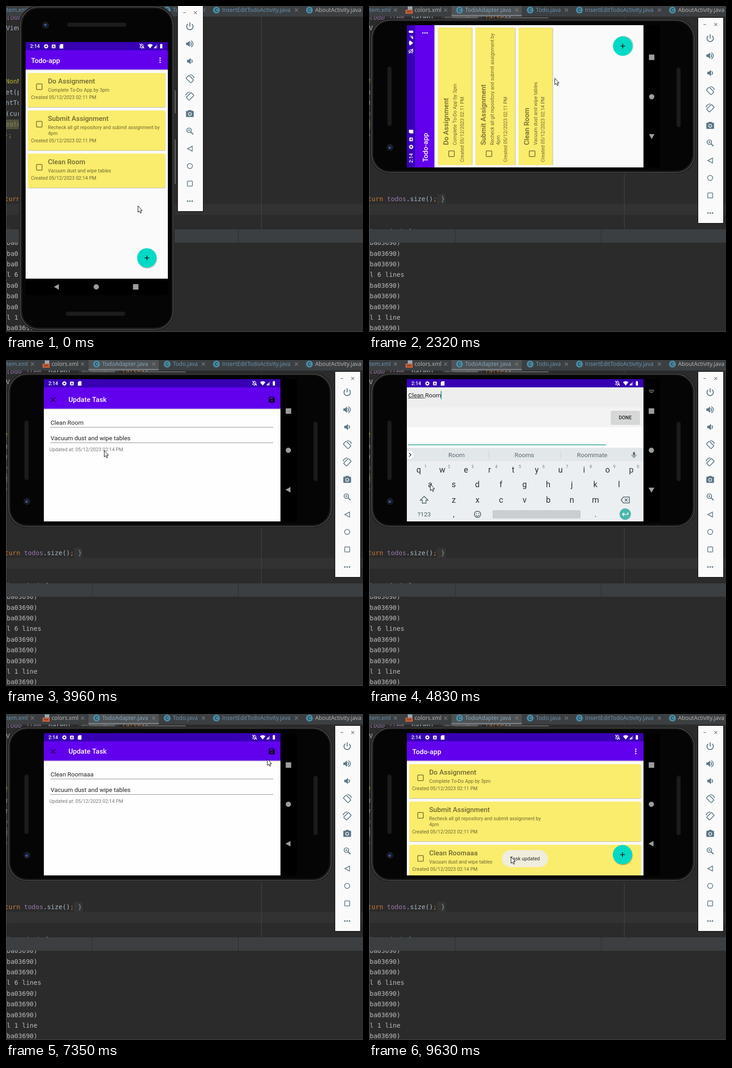
Recreate the animation shown at these times as an HTML page with a canvas. Size 783 by 715 pixels, loop 9650 ms.

```html
<!DOCTYPE html>
<html lang="en">
<head>
<meta charset="utf-8">
<title>Todo-app</title>
<style>
html, body { margin: 0; width: 100%; height: 100%; overflow: hidden; background: #2b2b2b; }
canvas { display: block; }
</style>
</head>
<body>
<canvas id="stage" width="783" height="715"></canvas>
<script>
const c = document.getElementById('stage').getContext('2d');
const LOOP = 9650, MONO = '"DejaVu Sans Mono", monospace', TAB = '"Open Sans", sans-serif';
const BLUE = '#6897bb', GREY = '#bbbbbb', SLATE = '#5b7785', INK = 'rgba(0,0,0,.56)';

// bursts of activity: start, end, number of steps
const BURSTS = [[120, 1050, 8], [1200, 1650, 4], [2050, 2320, 3], [2720, 3580, 7], [3840, 4830, 9],
  [4970, 5880, 8], [6030, 6930, 8], [7080, 7500, 4], [7900, 8940, 9], [9080, 9630, 5]];

const POINTER = [[0, 289, 438], [120, 292, 430], [390, 345, 352], [520, 395, 300], [700, 462, 255], [850, 474, 212],
  [1050, 428, 168], [1650, 407, 158], [2320, 407, 158], [2720, 400, 165], [3007, 383, 176], [3580, 215, 318],
  [3840, 215, 300], [3964, 215, 198], [4210, 170, 134], [4400, 170, 134], [4830, 134, 272], [5370, 134, 272],
  [5750, 558, 334], [6030, 560, 336], [6416, 550, 198], [6930, 562, 127], [7080, 562, 127], [7500, 578, 84],
  [8160, 576, 84], [8940, 200, 305], [9080, 205, 306], [9630, 311, 313]];
const TURN = [[2320, -90], [2720, -42], [2863, -10], [3007, -1.2], [3150, 0]];
const OPEN = [[3840, 14, .6], [3964, 4.5, 1], [4088, 0, 1]];
const CLOSE = [[8030, -6, .1, 245], [8160, -2, .07, 288], [8290, 0, 0, 312]];
const TOAST = [[8030, 0], [8160, .3], [8290, .7], [8420, .95]];

function held(t) {
  let out = 0;
  for (const [a, b, n] of BURSTS) {
    if (t < a) break;
    const gap = (b - a) / (n - 1);
    out = a + gap * Math.min(n - 1, Math.floor((t - a) / gap + .2));
  }
  return out;
}

function at(keys, t) {
  let i = keys.findIndex(k => k[0] > t);
  if (i < 0) return keys[keys.length - 1].slice(1);
  if (!i) return keys[0].slice(1);
  const a = keys[i - 1], b = keys[i], f = (t - a[0]) / (b[0] - a[0]);
  return a.slice(1).map((v, j) => v + (b[j + 1] - v) * f);
}

function rect(x, y, w, h, fill) { c.fillStyle = fill; c.fillRect(x, y, w, h); }
function paint(fill, stroke, width = 1) {
  if (fill) { c.fillStyle = fill; c.fill(); }
  if (stroke) { c.strokeStyle = stroke; c.lineWidth = width; c.stroke(); }
}
function round(x, y, w, h, r, fill, stroke, width) {
  c.beginPath(); c.roundRect(x, y, w, h, r); paint(fill, stroke, width);
}
function disc(x, y, r, fill, stroke, width) {
  c.beginPath(); c.arc(x, y, r, 0, 7); paint(fill, stroke, width);
}
function arc(x, y, r, from, to, stroke, width) {
  c.beginPath(); c.arc(x, y, r, from, to); paint(null, stroke, width);
}
function poly(pts, fill, stroke, width, open) {
  c.beginPath();
  for (let i = 0; i < pts.length; i += 2) c.lineTo(pts[i], pts[i + 1]);
  if (!open) c.closePath();
  paint(fill, stroke, width);
}
function line(x1, y1, x2, y2, stroke, width) { poly([x1, y1, x2, y2], null, stroke, width, true); }
function cross(x, y, r, color, width) {
  line(x - r, y - r, x + r, y + r, color, width);
  line(x - r, y + r, x + r, y - r, color, width);
}
function plus(x, y, r, color, width) {
  line(x - r, y, x + r, y, color, width);
  line(x, y - r, x, y + r, color, width);
}
// y is the middle of the capitals
function text(s, x, y, size, color, align = 'left', style = '400', family = 'Roboto, sans-serif') {
  c.font = `${style} ${size}px ${family}`;
  c.fillStyle = color;
  c.textAlign = align;
  c.fillText(s, x, Math.round(y + size * .36));
}
const code = (s, x, y, color, style) => text(s, x, y, 14, color, 'left', style, MONO);
function group(x, y, fn, deg = 0) {
  c.save(); c.translate(x, y); c.rotate(deg * Math.PI / 180); fn(); c.restore();
}
function clip(x, y, w, h) { c.beginPath(); c.rect(x, y, w, h); c.clip(); }

function editor() {
  rect(0, 0, 783, 715, '#2b2b2b');
  rect(0, 434, 783, 24, '#323232');
  rect(559.5, 23, 1, 467, '#4b4b4b');
  rect(0, 249, 40, 21, '#52503a');

  code('todo_item', 1, 25, '#9876aa', 'italic 400');
  code(', parent,', 76, 25, '#a9b7c6');
  round(160, 16, 88, 18, 4, '#3b3b3b');
  text('attachToRoot:', 166, 25, 12, '#7a7a7a');
  code('false', 254, 25, '#cc7832');
  code(');', 296, 25, '#a9b7c6');
  code('View', 0, 48, '#a9b7c6');
  code('NonNull', -1, 165, '#bbb529');
  code('et(p', -1, 189, '#a9b7c6');
  code('ntTo', -1, 212, '#a9b7c6');
  code('(cur', -1, 236, '#a9b7c6');
  code('eate', -1, 259, '#7d8a55');
  code(')', -4, 283, '#a9b7c6');
  code(';', 5, 283, '#cc7832');
  round(149, 412, 19, 22, 2, '#343434');
  code('return', -19.5, 423, '#cc7832');
  code('todos', 39.5, 423, '#9876aa');
  code('.size()', 81.5, 423, '#a9b7c6');
  code(';', 140.5, 423, '#cc7832');
  code('}', 158, 423, '#8a9a8a');
  code('i  todos) {', 0, 495, '#a9b7c6');

  rect(0, 0, 783, 23, '#3c3f41');
  rect(181, 0, 154, 23, '#4e5254');
  rect(181, 19.5, 154, 3.5, '#747a80');
  const tabs = [[1, 'tem.xml', BLUE, 58], [100, 'colors.xml', GREY, 168], [211, 'TodoAdapter.java', '#86abc6', 324],
    [366, 'Todo.java', BLUE, 433], [474, 'InsertEditTodoActivity.java', BLUE, 637], [678, 'AboutActivity.java', GREY]];
  tabs.forEach(([x, name, color, close], i) => {
    text(name, x, 9, 12.3, color, 'left', '400', TAB);
    if (close) cross(close, 9, 3.5, '#7c8083', 1.1);
    if (i > 1) {
      disc(x - 12.5, 9, 7.5, '#4a8ca6');
      text('C', x - 12.5, 9, 10.5, '#20333c', 'center', '500');
    }
  });
  rect(85, 1, 10, 8, '#9aa7b0');
  rect(80, 8, 16, 9, '#c4603a');
  text('<>', 88, 12, 9, '#3c2a22', 'center', '500');

  rect(0, 490, 783, 29, '#3c3f41');
  rect(189, 490, 1, 29, '#2a2a2a');
  rect(509, 490, 1, 29, '#2a2a2a');
  c.save();
  clip(0, 519, 783, 196);
  const hex = 'ba03690)';
  [hex, hex, hex, 'l 6 lines', hex, hex, hex, 'l 1 line', hex].forEach((s, i) => code(s, 1.5, 519.2 + i * 23.4, GREY));
  c.restore();
  rect(0, 23, 1, 692, '#55585a');
  rect(0, 714, 783, 1, '#4a4c4e');
}

function grille(y) {
  round(134, y - 4, 130, 8, 4, '#141414', '#1e1e1e');
  c.setLineDash([1.2, 1.2]);
  for (const d of [-2, 0, 2]) line(137, y + d, 261, y + d, '#363636', 1);
  c.setLineDash([]);
}

// upright handset
function body() {
  rect(368, 185, 4, 50, '#6a6a6a');
  rect(368, 293, 4, 97, '#6a6a6a');
  round(28.5, -1, 341, 713.5, 42, '#1a1a1a', '#333');
  round(31.5, 2, 335, 707.5, 40, null, '#505050', 1.6);
  round(35, 5, 329, 701, 37, '#050505', '#1c1c1c');
  rect(43, 79, 312, 555, '#000');
  grille(41);
  group(-2.5, 0, () => grille(675));
  disc(87, 42, 7, '#15171c', '#22252a');
  disc(87, 42, 4, '#1d2c55');
  disc(86, 41, 1.6, '#6d86bd');
}

const NAV = '#9c9c9c';
function backKey(x, y, r = 6) { poly([x - r, y, x + r - 1, y - r, x + r - 1, y + r], NAV); }
function navPortrait() {
  backKey(111, 616);
  disc(198, 616, 5.8, NAV);
  rect(278.5, 610, 12, 12, NAV);
}
function navLandscape(typing) {
  rect(613.5, 106, 12, 12, NAV);
  disc(619.3, 198, 5.8, NAV);
  if (!typing) return backKey(619, 284.5);
  poly([613, 280, 626, 280, 619.5, 291], NAV);
  for (let i = 0; i < 10; i++) rect(614 + i % 5 * 2.4, 65 + (i > 4) * 2.6, 1.5, 1.6, NAV);
  rect(616.5, 70.5, 6, 1.4, NAV);
}

function statusBar(w) {
  rect(0, 0, w, 18, '#3700b3');
  text('2:14', 10, 9.4, 10.7, '#fff', 'left', '500');
  disc(45, 9.4, 2.9, null, '#fff', 2);
  for (let i = 0; i < 8; i++) group(45, 9.4, () => rect(-.9, -4.9, 1.8, 2, '#fff'), i * 45);
  round(57.5, 5.4, 8, 8, 1, '#fff');
  text('A', 61.5, 9.4, 7, '#3700b3', 'center', '700');
  poly([77, 4.5, 82.5, 4.5, 82.5, 14.2, 74.5, 14.2, 74.5, 7], '#fff');
  const bell = w - 57;
  poly([bell - 4, 12, bell - 3, 10, bell - 3, 7, bell, 4, bell + 3, 7, bell + 3, 10, bell + 4, 12], null, '#fff', 1.2);
  rect(bell - 1, 12.8, 2, 1.5, '#fff');
  line(bell - 5, 4, bell + 5, 14, '#fff', 1.2);
  c.beginPath(); c.moveTo(w - 39, 14); c.arc(w - 39, 13.6, 9, -2.28, -.86); paint('#fff');
  poly([w - 31, 13.5, w - 23, 13.5, w - 23, 5], 'rgba(255,255,255,.45)');
  poly([w - 31, 13.5, w - 26, 13.5, w - 26, 8], '#fff');
  round(w - 17, 5, 5, 9, 1, '#fff');
  rect(w - 15.7, 4, 2.4, 2, '#fff');
}

function header(w, off) {
  rect(0, 60 + off, w, 2.5, 'rgba(0,0,0,.13)');
  rect(0, 18, w, 42.3 + off, '#6200ee');
}

function listPage(w, h, third, off = 0, dim = 0, cut = h) {
  c.save();
  clip(0, 0, w, h);
  rect(0, 0, w, h, '#fefefe');
  c.save();
  clip(0, 0, w, cut);
  rect(0, 0, w, h, '#fafafa');
  header(w, off);
  c.translate(0, off);
  text('Todo-app', 12, 40.2, 15.1, '#fff', 'left', '500');
  for (const d of [-4.6, 0, 4.6]) disc(w - 17, 39.8 + d, 1.5, '#fff');
  const cards = [['Do Assignment', '11', 'Complete To-Do App by 3pm'],
    ['Submit Assignment', '11', 'Recheck all git repository and submit assignment by', '4pm'],
    [third, '14', 'Vacuum dust and wipe tables']];
  let y = 68;
  for (const [title, min, ...lines] of cards) {
    const ch = 62.5 + 12.4 * lines.length;
    round(5, y + 1, w - 10.5, ch, 2.5, 'rgba(0,0,0,.26)');
    round(5, y, w - 10.5, ch, 2.5, '#faec6c');
    round(23.8, y + 23.8, 12.4, 12.4, 1.5, null, '#716a33', 1.5);
    text(title, 49, y + 17.3, 15.1, INK, 'left', '500');
    lines.forEach((s, i) => text(s, 49, y + 37 + i * 12.5, 10.6, INK));
    text(`Created 05/12/2023 02:${min} PM`, 11.7, y + ch - 21.8, 10.6, INK);
    y += ch + 7.3;
  }
  disc(w - 45, h - 43.5, 21.5, 'rgba(0,0,0,.2)');
  disc(w - 46, h - 45.5, 21.3, '#03dac5');
  plus(w - 46, h - 45.5, 5.3, '#111', 1.5);
  c.translate(0, -off);
  statusBar(w);
  if (dim) rect(0, 0, w, h, `rgba(0,0,0,${dim})`);
  c.restore();
  c.restore();
}

function updatePage(w, h, name, off) {
  c.save();
  clip(0, 0, w, h);
  rect(0, 0, w, h, '#fefefe');
  header(w, off);
  c.translate(0, Math.round(off));
  cross(20.5, 40, 4.7, '#0a0014', 1.5);
  text('Update Task', 54, 40, 15.1, '#fff', 'left', '500');
  poly([493.5, 33.5, 503.5, 33.5, 506.5, 36.5, 506.5, 46.5, 493.5, 46.5], '#0a0014');
  rect(495.5, 35, 7, 3.4, '#6200ee');
  disc(500, 42.6, 2, '#6200ee');
  [[name, 90], ['Vacuum dust and wipe tables', 124]].forEach(([s, y]) => {
    text(s, 14.8, y, 13.4, '#222');
    rect(14, y + 10, 489, 1, '#8a8a8a');
  });
  text('Updated at: 05/12/2023 02:14 PM', 12, 149, 10.7, '#777');
  c.translate(0, -Math.round(off));
  statusBar(w);
  c.restore();
}

// full-screen text entry, in stage coordinates
function keyboard(word, rest, hints, caretAt, caret) {
  const KEY = '#263238';
  rect(83, 60, 519, 45, '#eeeeee');
  rect(83, 104, 519, 44, '#f3f3f3');
  rect(83, 147, 519, 46, '#fdfdfd');
  text(word + rest, 86, 77, 13.4, '#222');
  const wide = c.measureText(word).width, all = c.measureText(word + rest).width;
  rect(86, 83, wide, 1, '#333');
  if (caret) rect(85.3 + (caretAt ? all : 0), 68, 1.5, 18, '#00897b');
  rect(85.5, 185.3, 434, 1.6, '#2aa194');
  round(531, 112, 62.5, 29.5, 2, '#d6d7d7', '#c9c9c9', .8);
  text('DONE', 562, 126.5, 10.6, '#222', 'center', '500');

  rect(83, 192.5, 519, 30, '#e2e7ea');
  rect(83, 222, 519, 132, '#eceff1');
  c.save(); clip(83, 192, 30, 30); disc(89, 208, 9, '#fff'); c.restore();
  poly([88, 204, 92, 208, 88, 212], null, KEY, 1.5, true);
  hints.forEach((s, i) => text(s, 192 + i * 148.7, 208.5, 13.6, '#5d686e', 'center'));
  rect(262, 199, 1, 18, '#cbd1d5');
  rect(419.5, 199, 1, 18, '#cbd1d5');
  round(579, 201.5, 4.4, 8.5, 2.2, '#5d686e');
  arc(581.2, 207.5, 4.6, 0, Math.PI, '#5d686e', 1.4);
  rect(580.5, 212, 1.4, 3, '#5d686e');

  [['qwertyuiop', 109, 241], ['asdfghjkl', 134, 273], ['zxcvbnm', 186, 306.5]].forEach(([row, x, y], r) => {
    [...row].forEach((k, i) => {
      text(k, x + i * 51.8, y, 17.8, KEY, 'center');
      if (!r) text(String((i + 1) % 10), x + 14.8 + i * 51.8, y - 7, 8.5, '#68747a', 'center');
    });
  });
  poly([121, 299, 129.5, 307.5, 125, 307.5, 125, 314, 117, 314, 117, 307.5, 112.5, 307.5], null, '#455a64', 1.5);
  poly([553, 307, 558, 300.5, 571, 300.5, 571, 313.5, 558, 313.5], null, '#455a64', 1.5);
  cross(564, 307, 3, '#455a64', 1.4);
  text('?123', 121, 338.5, 13.4, '#455a64', 'center');
  text(',', 186, 338, 17, KEY, 'center');
  text('.', 497, 338, 17, KEY, 'center');
  disc(238, 338.5, 7, null, '#455a64', 1.5);
  disc(235.4, 336.5, 1.1, '#455a64');
  disc(240.6, 336.5, 1.1, '#455a64');
  arc(238, 338.8, 3.8, .2, 2.94, '#455a64', 1.4);
  round(271, 329.5, 193, 18, 2, '#c8ced2');
  disc(562, 338, 12.5, '#4db6ac');
  poly([568, 334, 568, 338.5, 556, 338.5], null, '#fff', 1.7, true);
  poly([559.5, 335, 556, 338.5, 559.5, 342], null, '#fff', 1.7, true);
}

function toolbar(hover) {
  rect(376, 0, 57, 451, '#000');
  rect(377, 0, 55, 450, '#fafafa');
  if (hover) round(387, 145, 33.5, 30, 3, '#cacaca');
  rect(388.5, 14, 6, 1.1, '#666');
  cross(415.5, 14.5, 3.2, '#666', 1.1);
  group(403.3, 44, () => {
    arc(0, 1, 7, -.9, Math.PI + .9, SLATE, 2);
    rect(-1, -8, 2, 9, SLATE);
  });
  const speaker = x => poly([x, -2.8, x + 3.5, -2.8, x + 8, -7, x + 8, 7, x + 3.5, 2.8, x, 2.8], SLATE);
  group(403, 83, () => {
    speaker(-8);
    arc(0, 0, 3.5, -1.2, 1.2, SLATE, 2);
    arc(0, 0, 7.2, -1.2, 1.2, SLATE, 1.7);
  });
  group(404, 121, () => { speaker(-7); arc(1, 0, 3.5, -1.2, 1.2, SLATE, 2); });
  const turn = flip => () => {
    c.scale(flip, 1);
    arc(0, 0, 9.3, -1.6, -.2, SLATE, 1.6);
    c.rotate(-Math.PI / 4);
    round(-5, -7.5, 9, 15, 1.2, null, SLATE, 1.7);
  };
  group(403.5, 160, turn(1));
  group(403.5, 198, turn(-1));
  group(403.3, 236, () => {
    round(-8.5, -6, 17, 13.5, 1.6, SLATE);
    rect(-3.5, -7.8, 7, 3, SLATE);
    disc(0, .8, 3.9, '#fafafa');
    disc(0, .8, 2.5, SLATE);
  });
  group(401.5, 272.5, () => {
    disc(0, 0, 5, null, SLATE, 1.7);
    plus(0, 0, 2.6, SLATE, 1.2);
    line(3.8, 3.8, 9, 9, SLATE, 2.2);
  });
  poly([398, 313, 408.5, 307.5, 408.5, 318.5], null, SLATE, 1.5);
  disc(403.3, 351, 5.6, null, SLATE, 1.5);
  round(397.8, 384, 11, 11, 1, null, SLATE, 1.5);
  for (const d of [-5, 0, 5]) disc(403.3 + d, 428, 1.7, SLATE);
}

function toast(alpha) {
  c.globalAlpha = alpha;
  round(291.5, 298.5, 101, 37.5, 18.7, '#f0eee3');
  text('Task updated', 342, 317.3, 10.9, '#222', 'center');
  c.globalAlpha = 1;
}

function pointer(x, y) {
  group(x, y, () => poly([.5, .5, .5, 14.5, 3.6, 11.6, 5.8, 16.4, 8, 15.4, 5.9, 10.7, 10, 10.7], '#fff', '#000', 1));
}

function portrait() {
  body();
  group(43, 79, () => listPage(312, 519, 'Clean Room'));
  navPortrait();
}

function landscapeScreen(t) {
  const W = 519, H = 312, typing = t >= 4430 && t < 7070;
  const extra = 'a'.repeat(t < 5090 ? 0 : t < 5220 ? 1 : t < 5350 ? 2 : 3), name = 'Clean Room' + extra;
  const page = fn => group(83, 42, fn);
  c.save();
  clip(83, 42, 555, 312);
  if (t < 3830) {
    c.translate(342, 197);
    c.rotate(at(TURN, t)[0] * Math.PI / 180);
    c.translate(-342, -197);
    page(() => listPage(W, H, name));
  } else if (t < 8020) {
    const [off, alpha] = at(OPEN, t);
    if (alpha < 1) page(() => listPage(W, H, name));
    c.globalAlpha = alpha;
    page(() => updatePage(W, H, name, off));
    c.globalAlpha = 1;
    if (typing) {
      const blink = Math.floor((t - 6030) / 500) % 2 === 0;
      if (t < 5800) keyboard('Clean ', 'Room' + extra, ['Room', 'Rooms', 'Roommate'], true, true);
      else keyboard('Vacuum', ' dust and wipe tables', ['Vacuum', 'Vacuuming', 'Vacuumed'], false, blink);
    }
  } else {
    page(() => listPage(W, H, name, ...at(CLOSE, t)));
    toast(at(TOAST, t)[0]);
  }
  navLandscape(typing);
  c.restore();
}

function draw(now) {
  const t = held(now % LOOP);
  editor();
  if (t < 2150) {
    portrait();
    toolbar(t >= 2040);
  } else {
    group(4, 397, t < 2700 ? portrait : body, -90);
    if (t >= 2700) landscapeScreen(t);
    group(345, 26, () => toolbar(false));
  }
  pointer(...at(POINTER, t));
}

const start = performance.now();
function tick() {
  draw(performance.now() - start);
  requestAnimationFrame(tick);
}
tick();
</script>
</body>
</html>
```
